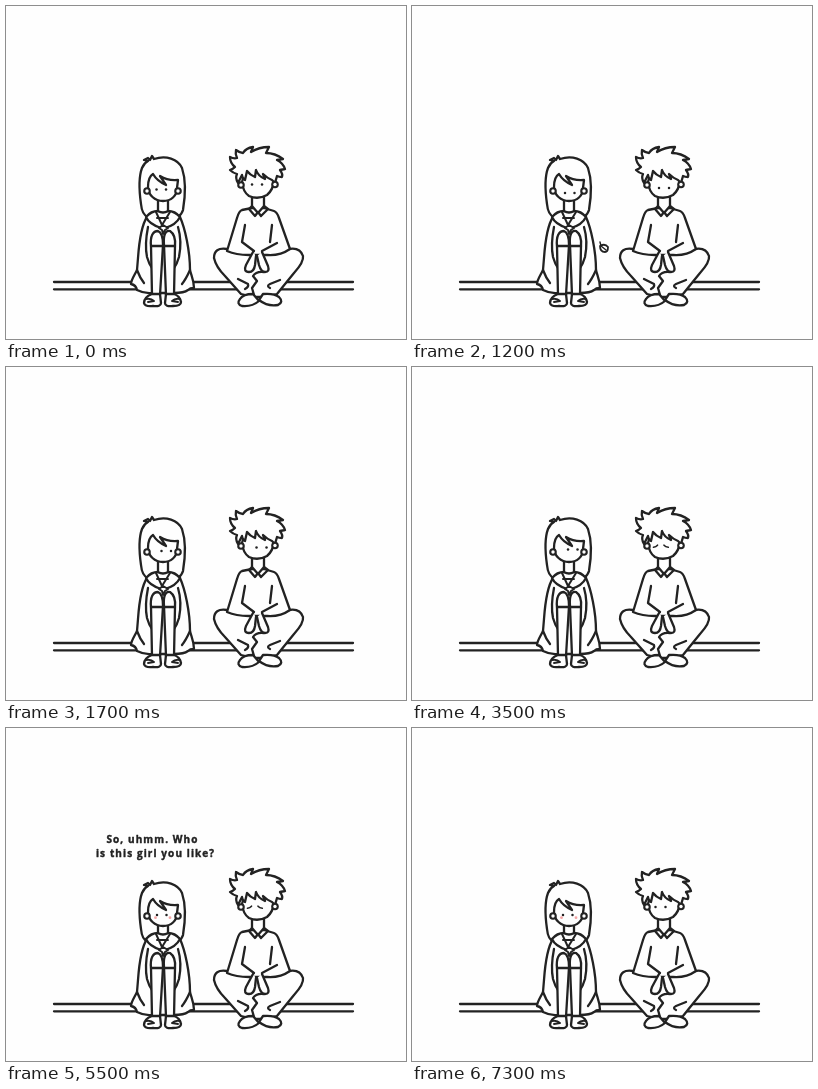
Animation of 400 by 333 pixels, one loop 8 s. Source, as an HTML page with a canvas:

```html
<!DOCTYPE html>
<html lang="en">
<head>
<meta charset="utf-8">
<title>Sitting together</title>
<style>
html, body { margin: 0; width: 100%; height: 100%; overflow: hidden; background: #fefefe; }
canvas { display: block; }
</style>
</head>
<body>
<canvas id="stage" width="400" height="333"></canvas>
<script>
const ctx = document.getElementById('stage').getContext('2d');
const LOOP = 8000, INK = '#222', PAPER = '#fefefe', PEN = 2.3;

function line(d, width = PEN) {
  ctx.lineWidth = width;
  ctx.stroke(new Path2D(d));
}

function shape(d, width = PEN) {
  ctx.fill(new Path2D(d));
  line(d, width);
}

function dot(x, y, r, color) {
  ctx.fillStyle = color;
  ctx.beginPath();
  ctx.arc(x, y, r, 0, Math.PI * 2);
  ctx.fill();
  ctx.fillStyle = PAPER;
}

function ear(x, y) {
  dot(x, y, 3.8, INK);
  dot(x, y, 1.7, PAPER);
}

function eyes(x, y, gap) {
  dot(x, y, 1.25, INK);
  dot(x + gap, y, 1.25, INK);
}

function bench() {
  line('M48 276H347M48 283.3H347');
}

function girlBody() {
  shape('M141 211C135 220 133 238 132 252L131 264C128 270 125 274 125 278Q130 279 131 284Q139 288 146 287H168Q178 287 182 284Q184 282 188 282C188 274 185 269 184 264C184 245 179 222 174 211Z');
  line('M142 221C140 231 139 241 141 251Q143 258 146 262M172 221C175 231 175 241 173 251Q171 258 168 262');
  line('M131 264Q134 272 138 277M184 264Q180 273 176 278');
  shape('M145 240C144 230 147 225 152 225Q157 227 157 239L154 289H146Z');
  shape('M158 239C157 228 160 224 164 225Q170 229 169 240L168 289H160Z');
  line('M145 240H156M158 240H169');
  shape('M146 288Q138 291 138 297Q139 301 147 300Q155 301 155 297L154 288Z');
  shape('M160 288L159 297Q159 301 167 300Q175 300 175 296Q174 290 168 288Z');
  line('M140 293Q145 292 148 295L142 296M174 293Q169 292 166 295L172 296', 1.8);
}

function girlCollar() {
  shape('M152 205Q145 205 140 211Q143 218 155 222H159Q170 219 174 211Q169 205 162 205Z');
  line('M150 206L156 219L164 206M151 212H162', 2);
  shape('M157 219L153 222L156 224L157 228L159 224L162 222Z', 2);
}

function girl(pose) {
  const drop = pose.bowed ? 3 : 0;
  ctx.save();
  ctx.translate(0, drop);
  shape('M142 211Q136 209 135 198C133 184 133 170 136 162Q138 157 142 155L138 154L142 152L144 154L146 150L148 153C160 149 172 153 176 162C180 174 179 192 177 204Q176 208 172 211Z');
  ctx.restore();
  girlBody();
  girlCollar();
  ctx.save();
  ctx.translate(0, drop);
  shape(`M152 193V${205 - drop}Q157 ${208 - drop} 162 ${205 - drop}V193`);
  shape('M142 181C142 189 149 195 157 195C165 195 171 190 171 182L172 174Q162 175 154 170L160 179Q151 175 147 168Q142 171 142 181Z');
  ear(141, 185);
  ear(172, 185);
  ctx.restore();
  eyes(...pose.girlEyes, 9.5);
  if (pose.blush) {
    dot(149.5, 189.7, 1.4, '#f4a5a5');
    dot(164, 189.7, 1.4, '#f4a5a5');
  }
}

function boyBody() {
  shape('M221 243Q208 241 208 252Q210 261 219 270Q227 279 235 288L248 291H258L271 288Q279 278 288 267Q298 256 297 250Q294 241 283 243Z');
  shape('M246 202L236 204Q233 205 231 212L221 245Q230 249 243 249H261Q274 250 284 243L273 212Q271 206 268 205L258 202Z');
  line('M239 219L236 236L248 245M266 219L264 236M271 237L256 245');
  shape('M247 246L240 259Q237 266 243 266Q248 266 249 259L250 250');
  shape('M256 246L262 260Q264 266 259 266Q255 266 253 259L251 250');
  line('M232 273L242 278Q243 281 239 283M274 274L264 278Q260 280 264 282M258 266Q250 265 247 270L251 275L246 282L248 289');
  shape('M247 288Q237 288 234 293Q230 298 236 300Q246 301 253 295Z');
  shape('M257 288Q268 287 273 291Q278 296 272 299Q262 301 253 294Z');
}

function boyHead() {
  shape('M246 188V200L252 207L258 200V188');
  line('M246 200L243 203L249 210L252 206L255 210L262 203L258 200');
  shape('M236 176Q237 186 243 190Q252 194 261 189Q267 184 268 175L260 162H240Z');
  shape('M232 177Q229 172 231 168Q227 167 224 164Q227 163 229 161Q224 157 224 151Q228 153 231 152Q229 148 230 144Q234 147 237 147Q240 142 247 141L245 146Q253 141 263 141L260 147Q269 147 277 153L271 154Q277 157 279 163L274 164Q277 168 276 171Q273 171 271 170L269 177L266 174Q261 172 257 168L259 173Q252 170 250 164L249 171Q244 169 241 165L239 174Q236 172 236 169Z');
  ear(235, 179);
  ear(269, 178.5);
}

function boy(pose) {
  boyBody();
  boyHead();
  if (pose.closed) line('M241.5 180.3Q244 180 245.5 178.2M252 178.2Q253.5 180 256.3 180.3', 1.6);
  else eyes(...pose.boyEyes, 10);
}

// The wind carries the leaf between a few points: [ms, x, y].
const gusts = [[500, 45, 273], [800, 156, 271], [1200, 192, 242], [1300, 215, 240], [1600, 346, 266]];

function leaf(t) {
  const now = Math.floor(t / 100) * 100;
  if (now < 500 || now > 1600) return;
  const i = Math.max(1, gusts.findIndex(g => g[0] >= now));
  const [t0, x0, y0] = gusts[i - 1], [t1, x1, y1] = gusts[i];
  const k = (now - t0) / (t1 - t0);
  ctx.save();
  ctx.translate(x0 + (x1 - x0) * k, y0 + (y1 - y0) * k);
  ctx.rotate((now - 1200) / 400 * 1.2);
  shape('M-4 -2Q1 -5 4 -1Q4 4 1 4Q-4 4 -4 -2Z', 1.8);
  line('M-4 -6L-3 -2L2 2', 1.4);
  ctx.restore();
}

function poseAt(t) {
  let girlEyes = [150.5, 183.5], boyEyes = [246, 178.5];
  if (t >= 600) { girlEyes = [151, 187]; boyEyes = [245, 182]; }
  if (t >= 1100) { girlEyes = [153, 187]; boyEyes = [247, 182]; }
  if (t >= 1400) { girlEyes = [155.5, 184]; boyEyes = [250.5, 180.5]; }
  if (t >= 2700) { girlEyes = [156, 182.5]; boyEyes = [243.5, 179]; }
  if (t >= 4200) girlEyes = [151, 187];
  return {
    girlEyes, boyEyes,
    bowed: t >= 4200,
    blush: t >= 4700,
    closed: t >= 3500 && t < 7300
  };
}

function caption(text, x, y) {
  ctx.fillText(text, x, y);
  ctx.strokeText(text, x, y);
}

function speech() {
  ctx.font = 'bold 10px "Open Sans", sans-serif';
  ctx.letterSpacing = '1.1px';
  ctx.textAlign = 'center';
  ctx.fillStyle = INK;
  ctx.lineWidth = 0.4;
  caption('So, uhmm. Who', 146.5, 114.5);
  caption('is this girl you like?', 149.5, 128.5);
}

function draw(t) {
  ctx.fillStyle = PAPER;
  ctx.strokeStyle = INK;
  ctx.lineCap = ctx.lineJoin = 'round';
  ctx.fillRect(0, 0, 400, 333);
  const pose = poseAt(t);
  bench();
  girl(pose);
  boy(pose);
  leaf(t);
  if (t >= 5500 && t < 7000) speech();
}

const start = performance.now();
function tick() {
  draw((performance.now() - start) % LOOP);
  requestAnimationFrame(tick);
}
tick();
</script>
</body>
</html>
```
